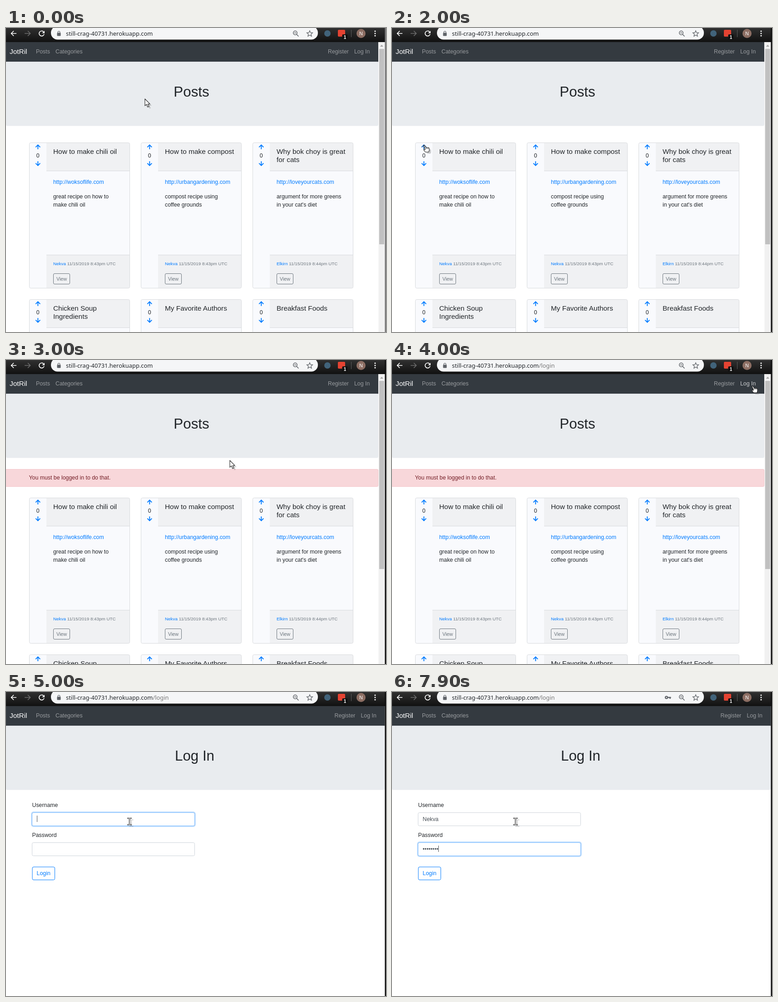
These frames come from a looping animation (837 px wide and 669 px high, 8 s). An HTML page:

```html
<!DOCTYPE html>
<html lang="en">
<head>
<meta charset="utf-8">
<title>Posts</title>
<style>
  html, body { margin: 0; width: 100%; height: 100%; overflow: hidden; background: #fff; }
  svg { display: block; width: 837px; height: 669px; }
  text { font-family: "Liberation Sans", Arial, sans-serif; font-size: 12.33px; fill: #212529; white-space: pre; }
  .address { font-family: "Noto Sans", sans-serif; font-size: 12.9px; }
</style>
</head>
<body>
<svg id="stage" viewBox="0 0 837 669" xmlns="http://www.w3.org/2000/svg"></svg>
<script>
const LOOP = 8000;
const STEP = 100;
const USER = "Nekva";
const BLUE = "#007bff";
const LINK_HOVER = "#0056b3";

const attrs = o => Object.entries(o).map(([k, v]) => `${k}="${v}"`).join(" ");
const text = (x, y, s, o = {}) => `<text x="${x}" y="${y}" ${attrs(o)}>${s}</text>`;
const rect = (x, y, width, height, fill, o = {}) =>
  `<rect ${attrs({ x, y, width, height, fill, ...o })}/>`;
const circle = (cx, cy, r, fill) => `<circle ${attrs({ cx, cy, r, fill })}/>`;
const path = (d, o = {}) => `<path ${attrs({ d, fill: "none", ...o })}/>`;
const group = (id, content, o = {}) => `<g id="${id}" ${attrs(o)}>${content}</g>`;
const line = (d, stroke, width, o = {}) => path(d, { stroke, "stroke-width": width, ...o });

function toolbar() {
  return rect(0, 0, 837, 31, "url(#bar)") +
    line("M23 12H12M17 6.5L11.5 12L17 17.5", "#fff", 1.7) +
    line("M41 12H53M48 6.5L53.5 12L48 17.5", "#6c6c6c", 1.7) +
    group("reload",
      line("M82.7 8.3A5.6 5.6 0 1 0 84 13.4", "#fff", 1.7) +
      path("M85 6V11.6H79.4Z", { fill: "#fff" })) +
    group("stop", line("M74 7.5L83 16.5M83 7.5L74 16.5", "#fff", 1.7)) +
    rect(99, -4, 588, 29.5, "#f5f6f7", { rx: 14.5 }) +
    rect(112.5, 10.5, 8, 7, "#5f6368", { rx: 1 }) +
    line("M114.2 11V9.3a2.3 2.3 0 0 1 4.6 0V11", "#5f6368", 1.2) +
    `<text class="address" x="132" y="17">still-crag-40731.herokuapp.com<tspan id="route" fill="#777">/login</tspan></text>` +
    group("key",
      circle(604.5, 12, 3.6, "#5f6368") + circle(604.5, 12, 1.3, "#f5f6f7") +
      line("M607 12H614.5M612.5 12V15", "#5f6368", 2.4)) +
    `<circle cx="637" cy="10.8" r="4.2" fill="none" stroke="#5f6368" stroke-width="1.5"/>` +
    line("M640 14L644.5 18.5M635 10.8H639", "#5f6368", 1.5) +
    line("M669 6l1.8 4.2 4.6.4-3.5 3 1.1 4.5-4-2.4-4 2.4 1.1-4.5-3.5-3 4.6-.4Z", "#5f6368", 1.3) +
    circle(708, 12, 7, "#41637a") +
    rect(731, 4, 16, 15, "#e44332", { rx: 2 }) +
    rect(740.5, 14, 12, 12, "#111", { rx: 2 }) +
    text(746.5, 24, "1", { "text-anchor": "middle", style: "fill:#fff;font-size:10px;font-weight:bold" }) +
    rect(760, 4, 1, 16, "#5c5c5c") +
    circle(782, 12, 10, "#8d6e63") +
    text(782, 16, USER[0], { "text-anchor": "middle", style: "fill:#fff;font-size:11px" }) +
    [7, 12, 17].map(y => circle(813, y, 1.6, "#fff")).join("");
}

function header(title, center, right, id) {
  const dim = { style: "fill:#999c9f" };
  return rect(0, 31, right, 43.5, "#343a40") +
    text(8, 57, "JotRil", { style: "fill:#fff;font-size:15.4px" }) +
    text(66, 56, "Posts", dim) + text(109, 56, "Categories", dim) +
    text(right - 111, 56, "Register", dim) +
    text(right - 53, 56, "Log In", { id, ...dim }) +
    rect(0, 74.5, right, 141, "#e9ecef", { rx: 3.6 }) + rect(0, 74.5, right, 8, "#e9ecef") +
    text(center, 151, title, { "text-anchor": "middle", style: "font-size:31.3px" });
}

const voteArrow = (y, dir, id) => line(
  `M19.3 ${y + 5 * dir}V${y - 4 * dir}M14.3 ${y + .6 * dir}L19.3 ${y - 4.4 * dir}L24.3 ${y + .6 * dir}`,
  BLUE, 1.9, { id });

function card([title, link, body, author, time], i) {
  const x = 51 + 246 * (i % 3), y = i < 3 ? 252 : 597;
  const edge = "#d8dadd", shade = "#f0f1f3";
  const lines = (s, top, style) =>
    s.split("|").map((part, n) => text(53, top + 18.5 * n, part, { style })).join("");
  return group("card" + i,
    rect(.5, .5, 221, 320, "#f9fafd", { rx: 3 }) +
    rect(38, 1, 183, 61.5, shade) + rect(38, 247, 183, 73, shade) +
    rect(38, 62, 183, 1, edge) + rect(38, 247, 183, 1, edge) +
    rect(.5, .5, 221, 320, "none", { rx: 3, stroke: edge }) +
    voteArrow(9.8, 1, "up" + i) + voteArrow(46.3, -1, "down" + i) +
    text(19.3, 32.5, "0", { "text-anchor": "middle" }) +
    lines(title, 24.5, "font-size:15.4px") +
    text(53, 91, link, { style: `fill:${BLUE}` }) +
    lines(body, 122.5, "") +
    `<text x="53" y="270.3" style="font-size:9.86px;fill:#6c757d"><tspan fill="${BLUE}">${author}</tspan> 11/15/2019 ${time}pm UTC</text>` +
    rect(53.5, 288.5, 36, 23, "none", { rx: 2.5, stroke: "#6c757d" }) +
    text(71.5, 303.6, "View", { "text-anchor": "middle", style: "font-size:10.8px;fill:#6c757d" }),
    { transform: `translate(${x} ${y})` });
}

const posts = [
  ["How to make chili oil", "http://woksoflife.com", "great recipe on how to|make chili oil", USER, "8:43"],
  ["How to make compost", "http://urbangardening.com", "compost recipe using|coffee grounds", USER, "8:43"],
  ["Why bok choy is great|for cats", "http://loveyourcats.com", "argument for more greens|in your cat's diet", "Elkirn", "8:44"],
  ["Chicken Soup|Ingredients", "", "", "", ""],
  ["My Favorite Authors", "", "", "", ""],
  ["Breakfast Foods", "", "", "", ""]
];

function postsPage() {
  return header("Posts", 408.5, 820, "postsLogin") +
    group("flash",
      rect(-2, 240.5, 822, 38, "#f8d7da", { rx: 3, stroke: "#f5c6cb" }) +
      text(50.5, 263, "You must be logged in to do that.", { style: "fill:#721c24" })) +
    group("cards", posts.map(card).join("")) +
    rect(820.5, 31, 14, 638, "#f1f1f1") +
    path("M824 41L827.5 37L831 41Z", { fill: "#a3a3a3" }) +
    rect(822, 46, 11, 430, "#c1c1c1", { id: "thumb" });
}

const field = (y, id) =>
  group(id + "Glow", rect(56.4, y - 1.1, 360.2, 31.2, "none", { rx: 4, stroke: "#bfdeff", "stroke-width": 2.6 })) +
  rect(57.5, y, 358, 29, "#fff", { rx: 3, stroke: "#ced4da" }) +
  group(id + "Edge", rect(57.5, y, 358, 29, "none", { rx: 3, stroke: "#80bdff" })) +
  text(67.5, y + 18, "", { id, style: "fill:#495057" });

function loginPage() {
  return header("Log In", 415.5, 834.5, "formLogin") +
    text(57.5, 253, "Username") + field(265.5, "name") +
    text(57.5, 319, "Password") + field(331.5, "secret") +
    rect(68, 0, 1, 14, "#495057", { id: "caret" }) +
    rect(58, 385, 49.5, 28.5, "#fff", { rx: 3, stroke: BLUE }) +
    text(82.7, 403, "Login", { "text-anchor": "middle", style: `fill:${BLUE}` });
}

// Each pointer is drawn around its hotspot, with an offset soft shadow.
const pointers = {
  arrow: "M0 0V15.2L3.6 12L6.2 18L8.8 16.9L6.3 11.2H11Z",
  hand: "M-4.3 -.8Q-3 -2.4 -1.5 -.8L1 3.2H6Q8 3.4 8 6V9Q8 11 6.6 13H-.4L-4 8.6Q-4.6 6.8 -2.4 7.2L-1 8V5Z",
  beam: "M-4.5 -8H-1L0 -7L1 -8H4.5V-6.3H1V6.3H4.5V8H1L0 7L-1 8H-4.5V6.3H-1V-6.3H-4.5Z"
};
const cursor = Object.entries(pointers).map(([id, d]) => group(id,
  path(d, { fill: "#555", opacity: .28, transform: "translate(4 3.5)" }) +
  path(d, { fill: "#fff", stroke: "#222", "stroke-width": id === "beam" ? .8 : 1.1, "stroke-linejoin": "round" }) +
  (id === "hand" ? line("M1.5 3.5V6M3.7 3.5V6M5.8 3.8V6", "#222", .8) : ""))).join("");

document.getElementById("stage").innerHTML =
  `<defs><linearGradient id="bar" x2="0" y2="1"><stop stop-color="#303030"/><stop offset="1" stop-color="#111"/></linearGradient></defs>` +
  rect(0, 0, 837, 669, "#fff") + group("posts", postsPage()) + group("login", loginPage()) +
  toolbar() + rect(834.5, 0, 2.5, 669, "#0c0c0c", { id: "windowEdge" }) + group("cursor", cursor);

const el = id => document.getElementById(id);
const show = (id, on) => { el(id).style.display = on ? "" : "none"; };
const within = (t, a, b) => t >= a && t < b;
const countPast = (t, times) => times.filter(at => t >= at).length;

const route = [
  [0, 306, 156], [100, 306, 156], [600, 182, 212], [1000, 78, 262], [1200, 74, 260],
  [2900, 74, 260], [3000, 493, 221], [3500, 819, 66], [3800, 797, 59], [4200, 797, 59],
  [4400, 520, 165], [4600, 68, 272], [4800, 272, 285], [LOOP, 272, 285]
];

function pointerAt(t) {
  const i = route.findIndex(p => p[0] > t);
  const [t0, x0, y0] = route[i - 1], [t1, x1, y1] = route[i];
  const k = (t - t0) / (t1 - t0);
  return [x0 + (x1 - x0) * k, y0 + (y1 - y0) * k];
}

const nameKeys = [5600, 5800, 5900, 6000, 6200];
const secretKeys = [6700, 6900, 7100, 7300, 7400, 7500, 7900, 7900];

function render(time) {
  const t = Math.floor(time / STEP) * STEP;
  const flashed = t >= 2200, onLogin = t >= 4100;
  const loading = within(t, 1500, 2000);
  show("posts", !onLogin);
  show("login", onLogin);
  show("flash", flashed);
  show("route", t >= 4000);
  show("reload", !loading);
  show("stop", loading);
  show("key", t >= 6700);
  el("cards").setAttribute("transform", `translate(0 ${flashed ? 51 : 0})`);
  el("thumb").setAttribute("height", flashed ? 414 : 430);
  el("up0").setAttribute("stroke", within(t, 1200, 2200) ? LINK_HOVER : BLUE);
  el("windowEdge").setAttribute("fill", t < 1600 ? "#777" : "#0c0c0c");
  const navColor = within(t, 3700, 4300) ? "#ccced0" : "#999c9f";
  el("postsLogin").style.fill = el("formLogin").style.fill = navColor;

  const inSecret = t >= 6300;
  const swap = Math.min(1, Math.max(0, (t - 6250) / 200));
  const focus = { name: t >= 5000 ? 1 - swap : 0, secret: swap };
  for (const id in focus)
    for (const part of ["Glow", "Edge"]) el(id + part).setAttribute("opacity", focus[id]);

  el("name").textContent = USER.slice(0, countPast(t, nameKeys));
  el("secret").textContent = "•".repeat(countPast(t, secretKeys));
  const typed = el(inSecret ? "secret" : "name");
  const width = onLogin && typed.textContent ? typed.getComputedTextLength() : 0;
  show("caret", t >= 5000 && !within(t, 5400, 5600));
  el("caret").setAttribute("x", 68 + Math.max(0, width - .5));
  el("caret").setAttribute("y", inSecret ? 338 : 272);

  const hand = within(t, 1200, 1500) || within(t, 2000, 3000) || within(t, 3700, 4300);
  const kind = hand ? "hand" : t >= 4700 ? "beam" : "arrow";
  for (const id in pointers) show(id, id === kind);
  el("cursor").setAttribute("transform", `translate(${pointerAt(t).join(" ")})`);
}

const start = performance.now();
function tick() {
  render((performance.now() - start) % LOOP);
  requestAnimationFrame(tick);
}
tick();
</script>
</body>
</html>
```
